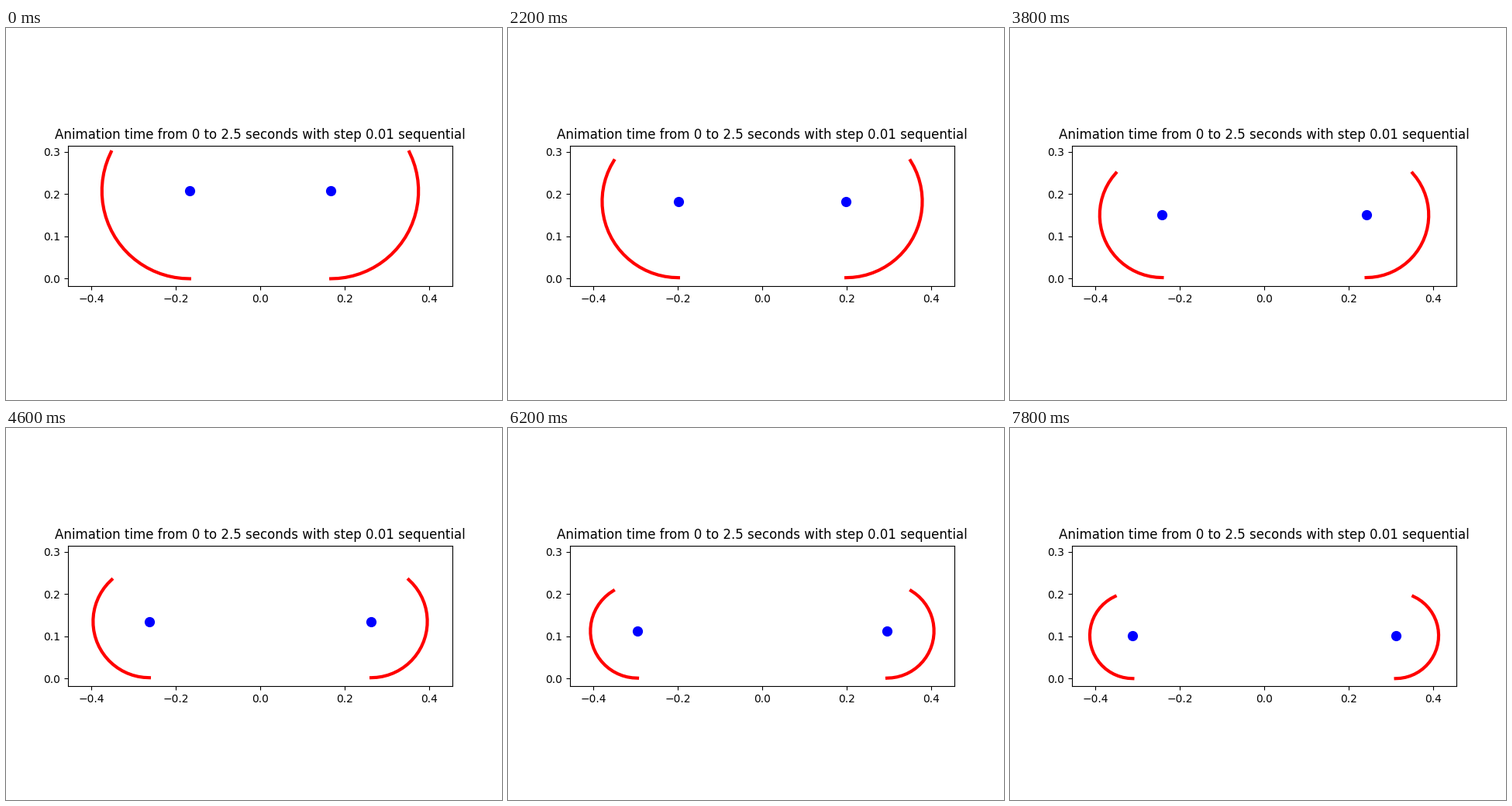
Write a matplotlib script that moves like this. It is 640x480 px and loops after 8000 ms.

```python
import numpy as np
import matplotlib.pyplot as plt
from matplotlib.animation import FuncAnimation

EDGE_X, TOP = 0.353, 0.3        # half width and start height of the body
LENGTH = 3 * np.pi / 8          # length of the shell
MASS, PRESSURE, G = 100, 2000, 9.81
DT, FRAMES = 0.01, 40
LAG = 0.65                      # how far the radius runs ahead of its centre

# Equilibrium shapes, one for each arc angle
angles = np.linspace(3.0, 1.9, 4000)
radii = (LENGTH / 2 - EDGE_X) / (angles - np.sin(angles))
heights = radii * (1 - np.cos(angles))


def shape(height):
    """Arc angle, radius and centre x for a body at this height."""
    phi = np.interp(height, heights, angles)
    r = np.interp(height, heights, radii)
    return phi, r, EDGE_X - r * np.sin(phi)


def simulate():
    y, v = TOP, 0.0
    states = [shape(y)]
    for _ in range(FRAMES - 1):
        contact = 2 * states[-1][2]
        v += DT * (PRESSURE * contact / MASS - G)
        y += DT * v
        states.append(shape(y))
    return states


states = simulate()

fig, ax = plt.subplots(figsize=(6.4, 4.8), dpi=100)
ax.set_aspect("equal")
ax.set_xlim(-0.455, 0.455)
ax.set_ylim(-0.0176, 0.3151)
ax.set_title("Animation time from 0 to 2.5 seconds with step 0.01 sequential")

arcs = [ax.plot([], [], color="red", lw=3)[0] for _ in range(2)]
dots, = ax.plot([], [], "o", color="blue", ms=8.5)


def draw(n):
    phi, cy, cx = states[n]
    r = cy - LAG * (states[max(n - 1, 0)][1] - cy)
    a = np.linspace(0, phi, 25)
    for side, arc in zip((-1, 1), arcs):
        arc.set_data(side * (cx + r * np.sin(a)), cy - r * np.cos(a))
    dots.set_data([-cx, cx], [cy, cy])
    return [*arcs, dots]


anim = FuncAnimation(fig, draw, frames=FRAMES, interval=200, repeat=True)
plt.show()
```
